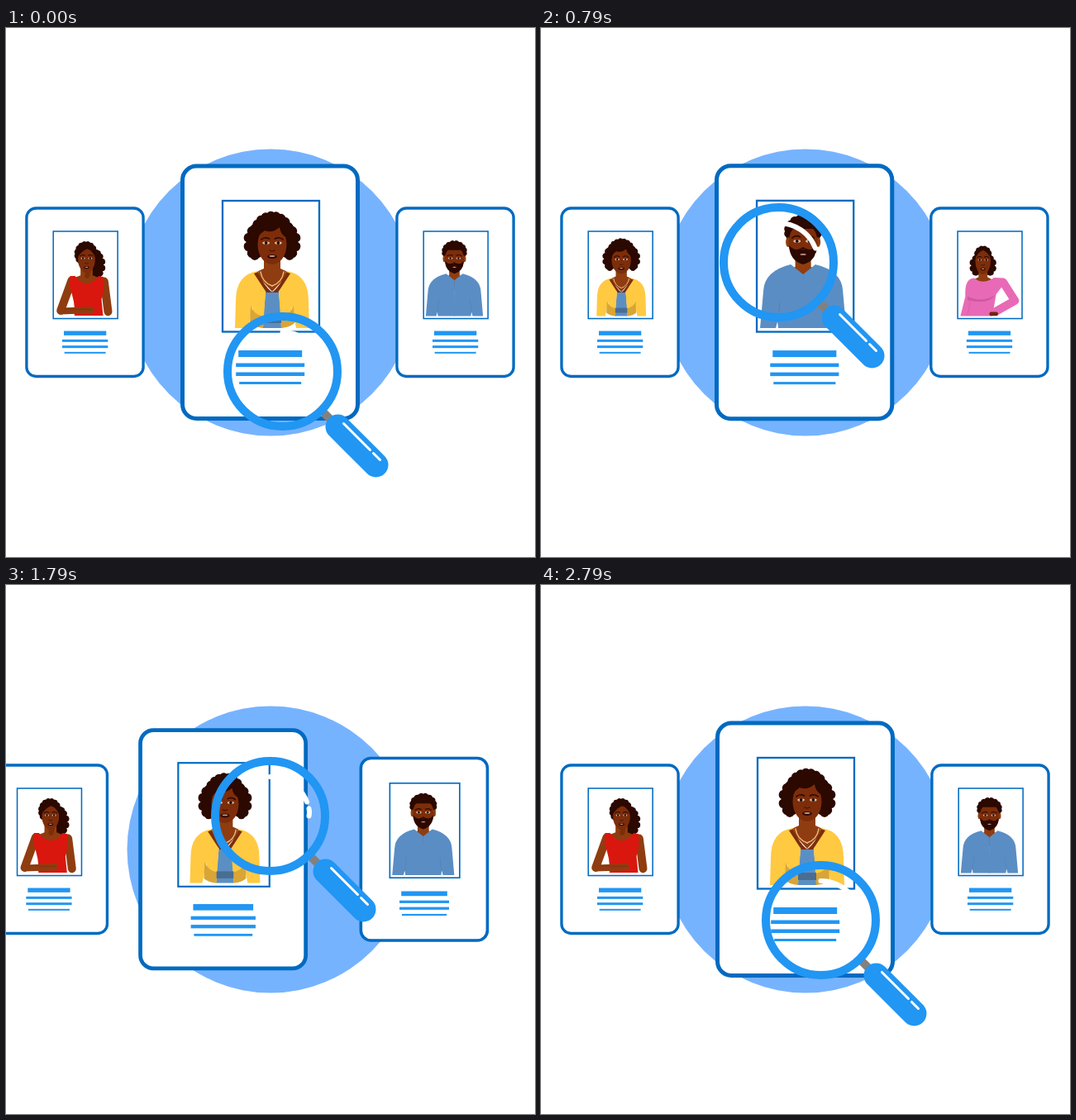
Animation, 640 px wide and 640 px high, one loop 2870 ms. Source, as an HTML page:

```html
<!DOCTYPE html>
<html lang="en">
<head>
<meta charset="utf-8">
<title>Profile search</title>
<style>
html, body { margin: 0; width: 100%; height: 100%; overflow: hidden; background: #fff; }
svg { display: block; width: 100vw; height: 100vh; }
</style>
</head>
<body>
<svg id="stage" viewBox="0 0 640 640" xmlns="http://www.w3.org/2000/svg"></svg>
<script>
const HAIR = '#2b0800', SKIN = '#7d2d0a', NECK = '#8f3d10', BLUE = '#2196f3', EDGE = '#006ac1';
const CX = 319.5, CY = 319.75, GAP = 224, SMALL = 0.666;
const LOOP = 2870, HALF = LOOP / 2, FPS = 14, LAST = 39;

const path = (d, fill, extra = '') => `<path d="${d}" fill="${fill}" ${extra}/>`;
const line = (d, color, w) =>
  path(d, 'none', `stroke="${color}" stroke-width="${w}" stroke-linecap="round" stroke-linejoin="round"`);
const oval = (x, y, rx, ry, fill) => `<ellipse cx="${x}" cy="${y}" rx="${rx}" ry="${ry}" fill="${fill}"/>`;
const box = (x, y, w, h, extra) => `<rect x="${x}" y="${y}" width="${w}" height="${h}" ${extra}/>`;
const at = (x, y, parts) => `<g transform="translate(${x} ${y})">${parts.join('')}</g>`;
const mirror = part => part + `<g transform="scale(-1 1)">${part}</g>`;

// Oval outline of small shallow curls
function curls(cx, cy, rx, ry) {
  const n = Math.round((rx + ry) / 2.6), r = Math.PI * (rx + ry) / n * 0.7;
  let d = '';
  for (let i = 0; i <= n; i++) {
    const a = i / n * 2 * Math.PI;
    d += (i ? `A${r} ${r} 0 0 1 ` : 'M') + `${cx + rx * Math.cos(a)} ${cy + ry * Math.sin(a)}`;
  }
  return path(d + 'Z', HAIR);
}

// People are drawn around the point between the eyes
const neck = w => path(`M${-w} 12H${w}V31L${2.1 * w} 36 0 ${31 + 2.8 * w} ${-2.1 * w} 36 ${-w} 31Z`, NECK);
const face = (w, beard = '') => oval(0, 2, w, 24, SKIN) + beard +
  mirror(oval(w * 0.42, 0, w * 0.25, 1.8, '#d9b9a4') + oval(w * 0.42, 0, 1.8, 1.9, '#1c0500') +
    line(`M${w * 0.2} -5q${w * 0.3} -3 ${w * 0.55} 1`, HAIR, 1.6)) +
  line('M-3 9q3 2 6 0', '#4b1604', 1.4) +
  oval(0, 16.5, w * 0.33, 2.6, '#320700') + oval(0, 16, w * 0.2, 0.9, '#c8a090');

const yellow = at(322, 260, [
  curls(0, -9, 26, 28), mirror(curls(21, -1, 10, 22)), neck(10),
  path('M-8 59H8L12 103H-12Z', '#5b8fc4'),
  mirror(path('M17 34Q44 38 44 70L45 103H29L24 77 21 99 11 103 8 59Z', '#ffc941') +
    path('M26 76Q22 87 11 89V103Q22 102 27 97Z', '#d8a536') +
    path('M17 35Q10 52 0 60H7L22 37Z', SKIN) +
    line('M14 35Q12 48 0 52', '#efb77c', 1.5)),
  path('M-11 88H11V97H-11Z', '#4a6d92'),
  face(17.5), path('M-18 -6Q-16 -24 0 -24T18 -6Q10 -10 9 -19 0 -11 -9 -15-14 -12-18 -6Z', HAIR)
]);

const man = at(318, 258, [
  curls(0, -12, 22, 19), neck(9.5),
  mirror(path('M0 40L15 28Q47 36 48 60L52 105H33L31 97 30 105H-1Z', '#5a8dc4') +
    line('M31 98L28 75', '#4f80b5', 0.8) + oval(18, 1, 3, 6, NECK)),
  face(17.5, path('M-17 5Q-9 14 0 7 9 14 17 5 16 24 0 28-16 24-17 5Z', HAIR)),
  path('M-18 -3V-22H18V-3Q16 -16 9 -15H-9Q-16 -16-18 -3Z', HAIR)
]);

const red = at(322.5, 258, [
  curls(-1, -8, 20, 22), curls(18, 12, 12, 28), neck(11),
  line('M-27 40L-47 95M32 42L39 97', NECK, 15),
  path('M-30 32H-21Q0 60 22 32L31 34Q33 60 27 74L30 104H-22Q-20 80-31 52Z', '#d9170f'),
  line('M-47 96L8 94', NECK, 12), line('M-40 92L10 93', SKIN, 1),
  line('M1 32L3 22', SKIN, 9), face(15.5),
  path('M-17 0Q-17 -23 0 -24 18 -22 17 2 12 -14 1 -17-10 -13-17 0Z', HAIR)
]);

const pink = at(308, 261, [
  curls(0, -9, 15, 16), mirror(curls(13, 10, 8, 19)), neck(8),
  line('M37 41L58 74 24 93', '#e86ab6', 15),
  path('M-16 33Q0 46 20 32L38 33Q44 38 38 44L24 62 17 102H-41L-32 66Q-34 34-16 33Z', '#e86ab6'),
  path('M-28 66Q-4 79 22 64 10 82-28 73Z', '#cf58a2'),
  line('M-23 76L-28 100', '#cf58a2', 1), line('M15 98H24', '#6e270c', 7), face(14),
  path('M-15 0Q-16 -22 0 -23 16 -22 15 0 11 -13 0 -18-11 -13-15 0Z', HAIR)
]);

const bar = (w, y, h) => box(319.7 - w / 2, y, w, h, `fill="${BLUE}"`);
const card = person => '<g class="part">' +
  box(213.5, 167, 212, 305.5, `rx="17" fill="#fff" stroke="${EDGE}" stroke-width="5"`) +
  box(262, 209, 117, 158.5, `fill="none" stroke="${EDGE}" stroke-width="2.3"`) + person +
  bar(77, 390, 8) + bar(83, 405.5, 4.5) + bar(83, 416.5, 4.5) + bar(75, 428, 3) + '</g>';

const lens = '<g class="part">' +
  line('M50 50L66 66', '#85807c', 10) + line('M67 67L113 113', BLUE, 30) +
  line('M74 63L106 95M110 99L118 107', '#fff', 3) +
  `<circle r="66.5" fill="none" stroke="${BLUE}" stroke-width="10"/>` +
  line('M0 -47.5A47.5 47.5 0 0 1 44.500 -17M47 -9Q48 -4 47 0', '#fff', 6) + '</g>';

const stage = document.getElementById('stage');
stage.innerHTML = '<circle cx="320" cy="320" r="173.5" fill="#76b3ff"/>' +
  [red, yellow, man, pink].map(card).join('') + lens;
const [redCard, yellowCard, manCard, pinkCard, glass] = stage.querySelectorAll('.part');

// Ease out with a slight overshoot
function slide(ms) {
  const v = 1 - Math.min(1, Math.max(0, (ms - 32) / 844));
  return 1 - 1.5 * v ** 3 + 0.5 * v ** 2;
}

// Stops on the closed path of the lens
const STOPS = [
  { t: 0, x: 334.5, y: 415.5 }, { t: 429, x: 357, y: 258.5 }, { t: 786, x: 287.5, y: 283.5 },
  { t: 1357, x: 343.5, y: 254.5 }, { t: 1786, x: 319.5, y: 279.5 },
  { t: 2143, x: 292.5, y: 324 }, { t: 2786, x: 338.5, y: 405.5 }
];
function stop(i) {
  const n = STOPS.length, s = STOPS[(i + n) % n];
  return { ...s, t: s.t + Math.floor(i / n) * LOOP };
}

// Smooth curve through the stops
function sweep(t, key) {
  let i = 0;
  while (stop(i + 1).t <= t) i++;
  const [a, b, c, d] = [-1, 0, 1, 2].map(k => stop(i + k));
  const span = c.t - b.t, u = (t - b.t) / span, w = 1 - u;
  const mb = (c[key] - a[key]) / (c.t - a.t) * span;
  const mc = (d[key] - b[key]) / (d.t - b.t) * span;
  return w * w * ((1 + 2 * u) * b[key] + u * mb) + u * u * ((1 + 2 * w) * c[key] - w * mc);
}

function place(el, dx, scale) {
  el.setAttribute('transform', `translate(${CX + dx} ${CY}) scale(${scale}) translate(${-CX} ${-CY})`);
}

function draw(ms) {
  const frame = Math.min(LAST, Math.floor((ms % LOOP) * FPS / 1000 + 0.08));
  const t = frame * 1000 / FPS;
  const p = t < HALF ? slide(t) : 1 - slide(t - HALF);
  const held = Math.min(1, Math.max(0, p)), grow = 1 - SMALL;
  place(redCard, -GAP - 260 * p, SMALL);
  place(yellowCard, -GAP * held - 138 * held * (1 - held), 1 - grow * held);
  place(manCard, GAP * (1 - p), SMALL + grow * p);
  place(pinkCard, GAP + 288 * (1 - p), SMALL);
  glass.setAttribute('transform', `translate(${sweep(t, 'x')} ${sweep(t, 'y')})`);
}

const start = performance.now();
function tick() {
  draw(performance.now() - start);
  requestAnimationFrame(tick);
}
tick();
</script>
</body>
</html>
```
